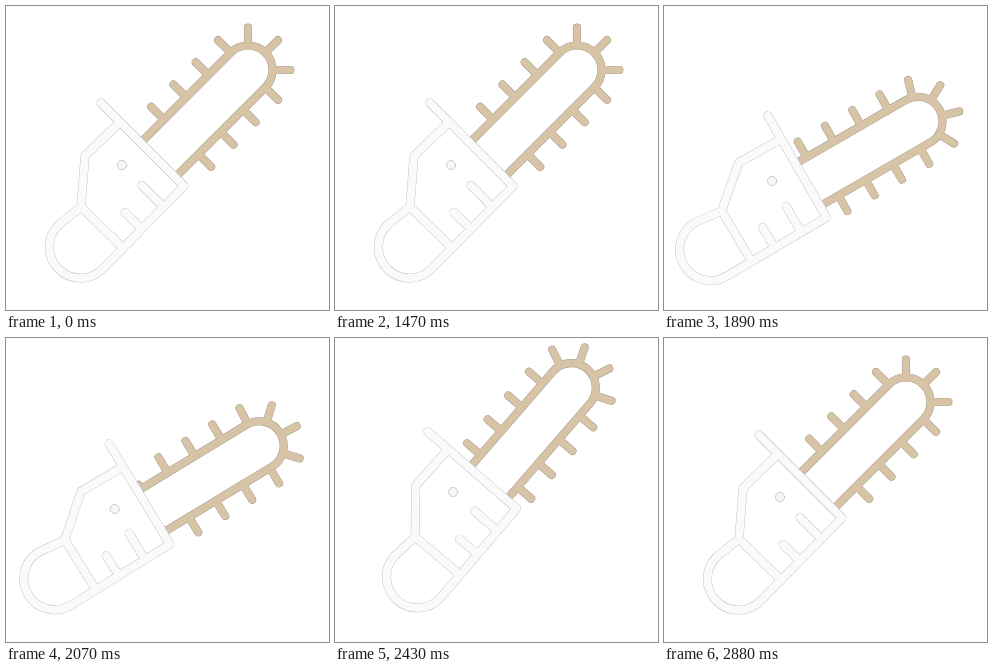
An HTML page that plays this animation: 323x304 px, repeating every 2910 ms.

```html
<!DOCTYPE html>
<html lang="en">
<head>
<meta charset="utf-8">
<title>Chainsaw</title>
<style>
  html, body { margin: 0; width: 100%; height: 100%; overflow: hidden; background: #fff; }
  svg { display: block; width: 100vw; height: 100vh; }
  path, circle { fill: none; stroke-linecap: round; stroke-linejoin: round; }
  .chain-edge { stroke: #9c9285; stroke-width: 8.1; }
  .chain-fill { stroke: #d7c4a7; stroke-width: 7.3; }
  .body-edge { stroke: #bcbcc0; stroke-width: 8.9; }
  .body-fill { stroke: #fafafb; stroke-width: 8.1; }
  .knob { fill: #f6f6f7; stroke: #bcbcc0; stroke-width: .7; }
</style>
</head>
<body>
<svg viewBox="0 0 323 304" preserveAspectRatio="none">
  <g id="saw">
    <g transform="translate(242 64) rotate(-45)">
      <g id="blade">
        <path class="chain-edge" data-part="chain"/>
        <path class="chain-fill" data-part="chain"/>
      </g>
    </g>
    <path class="body-edge" data-part="body"/>
    <path class="body-fill" data-part="body"/>
    <circle class="knob" cx="116" cy="159" r="4.6"/>
  </g>
</svg>
<script>
const LOOP = 2910;
const KNOB = [116, 159];
const BAR = 126;         // straight length of the guide bar
const RADIUS = 24.5;     // nose radius
const TOOTH_TIP = 42.4;  // distance of a tooth tip from the bar axis
const STEPS = 4;         // teeth per straight and around the nose

const BODY =
  'M95 97 L178 180 L96.5 263 A31.1 31.1 0 0 1 52.5 219 L75 201' +  // guard, base, handle
  'L79 150 L113 117' +                                             // front
  'M75 201 L115 240 M119 206.5 L134 221 M136 179.5 L155 198.5';    // divider, vents

const saw = document.getElementById('saw');
const blade = document.getElementById('blade');
const parts = name => document.querySelectorAll(`[data-part=${name}]`);
const setPath = (nodes, d) => nodes.forEach(node => node.setAttribute('d', d));
const chainPaths = parts('chain');
setPath(parts('body'), BODY);

const clamp = (v, lo, hi) => Math.min(hi, Math.max(lo, v));

// Keys are [time, value] pairs, joined by an ease in and out.
function track(keys, t) {
  let value = keys[0][1];
  for (let i = 1; i < keys.length; i++) {
    const [t0, v0] = keys[i - 1], [t1, v1] = keys[i];
    if (t < t0) break;
    const u = clamp((t - t0) / (t1 - t0), 0, 1);
    value = v0 + (v1 - v0) * u * u * (3 - 2 * u);
  }
  return value;
}

const TILT = [[1508, 0], [1852, 15], [1997, 15], [2482, -4.7], [2850, 0]];
const LIFT = [[1470, 0], [1760, 16], [1930, 16], [2430, -5], [2750, 0]];
const KICK = [[1720, 0], [2000, -1], [2450, -1], [2750, 0]];

// One tooth at step s: along one side, round the nose, back along the other.
function tooth(s) {
  const x = -BAR * clamp(Math.max(1 - s / STEPS, s / STEPS - 2), 0, 1);
  const angle = (clamp(s / STEPS - 1, 0, 1) - .5) * Math.PI;
  const grow = clamp(Math.min(s, 3 * STEPS - s) / .3, 0, 1);
  const tip = RADIUS + (TOOTH_TIP - RADIUS) * grow;
  const at = r => `${(x + r * Math.cos(angle)).toFixed(2)} ${(r * Math.sin(angle)).toFixed(2)}`;
  return `M${at(RADIUS)}L${at(tip)}`;
}

function chain(phase) {
  let d = `M${-BAR} ${-RADIUS}H0A${RADIUS} ${RADIUS} 0 0 1 0 ${RADIUS}H${-BAR}`;
  for (let s = 1 - phase % 1; s < 3 * STEPS; s++) d += tooth(s);
  return d;
}

function draw(t) {
  const tilt = track(TILT, t);
  saw.setAttribute('transform',
    `translate(${-.53 * tilt} ${track(LIFT, t)}) rotate(${tilt} ${KNOB})`);
  blade.setAttribute('transform', `translate(0 ${track(KICK, t)})`);
  setPath(chainPaths, chain(clamp((t - 1500) / 620, 0, 2)));
}

const start = performance.now();
function tick() {
  draw((performance.now() - start) % LOOP);
  requestAnimationFrame(tick);
}
tick();
</script>
</body>
</html>
```
